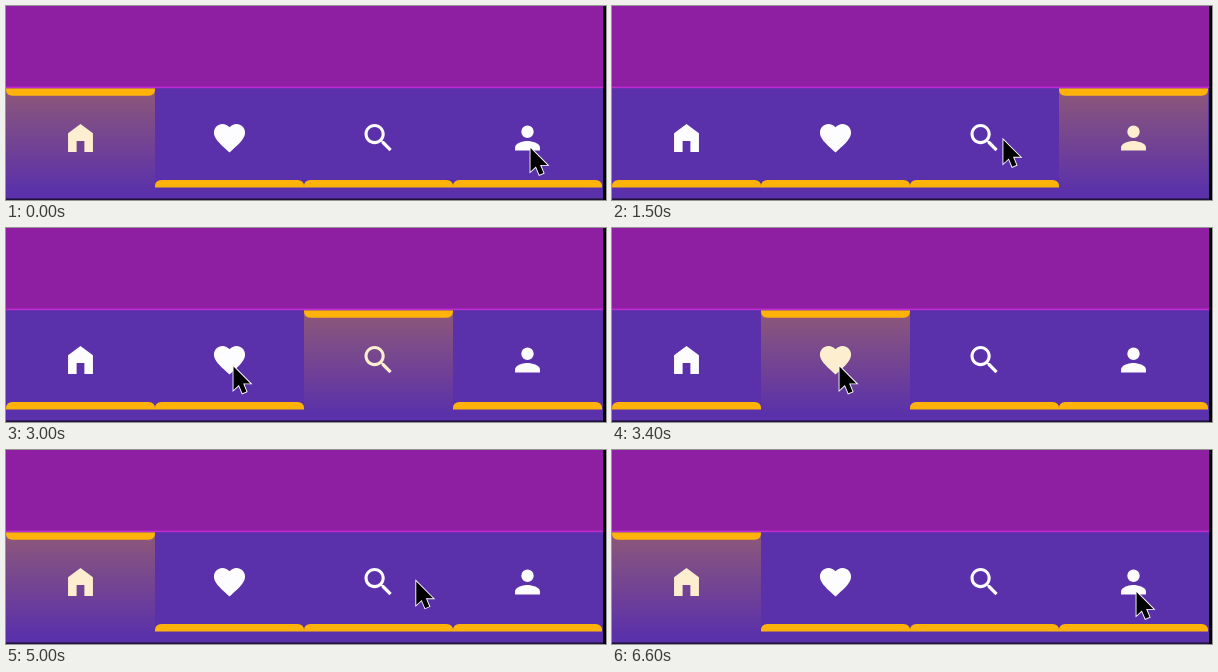
These frames come from a looping animation (600x194 px, 6700 ms). An HTML page:

```html
<!DOCTYPE html>
<html lang="en">
<head>
<meta charset="utf-8">
<title>Tab bar</title>
<style>
  html, body { margin: 0; width: 100%; height: 100%; overflow: hidden; background: #5a30ab; }
  svg { display: block; width: 100vw; height: 100vh; }
</style>
</head>
<body>
<svg id="stage" viewBox="0 0 600 194">
  <defs>
    <linearGradient id="glow" x1="0" y1="0" x2="0" y2="1">
      <stop offset="0" stop-color="#ffb30a" stop-opacity=".31"/>
      <stop offset="1" stop-color="#ffb30a" stop-opacity="0"/>
    </linearGradient>
  </defs>
  <rect width="600" height="194" fill="#5a30ab"/>
  <rect width="600" height="81" fill="#8e1fa2"/>
  <rect y="80.6" width="600" height="1.6" fill="#c02bd2"/>
  <g id="tabs"></g>
  <rect y="192.4" width="600" height="1.6" fill="#21133f"/>
  <rect x="597" width="3" height="194" fill="#000"/>
  <path id="cursor" d="M0 0V23.5L5.4 18.5 8.9 26.8 13 25 9.6 16.9H16.8Z"
        fill="#000" stroke="#fff" stroke-width="1.8" paint-order="stroke"/>
</svg>
<script>
const LOOP = 6700, TAB = 149, TOP = 82.4, LOW = 174, BAR = 7.4, FADE = 300;
const ICONS = [
  'M4 21V9l8-6 8 6v12h-5.5v-7h-5v7z',
  'M12 21.35l-1.45-1.32C5.4 15.36 2 12.28 2 8.5 2 5.42 4.42 3 7.5 3c1.74 0 3.41.81 4.5 2.09C13.09 3.81 14.76 3 16.5 3 19.58 3 22 5.42 22 8.5c0 3.78-3.4 6.86-8.55 11.54z',
  'M15.5 14h-.79l-.28-.27C15.41 12.59 16 11.11 16 9.5 16 5.91 13.09 3 9.5 3S3 5.91 3 9.5 5.91 16 9.5 16c1.61 0 3.09-.59 4.23-1.57l.27.28v.79l5 4.99L20.49 19l-4.99-5zm-6 0C7.01 14 5 11.99 5 9.5S7.01 5 9.5 5 14 7.01 14 9.5 11.99 14 9.5 14z',
  'M12 12a4 4 0 1 0 0-8 4 4 0 1 0 0 8zm0 2c-2.67 0-8 1.34-8 4v2h16v-2c0-2.66-5.33-4-8-4z'
];
const CLICKS = [
  { at: 360, tab: 3 },
  { at: 1841, tab: 2 },
  { at: 3050, tab: 1 },
  { at: 4450, tab: 0 }
];
const HOME = [75.2, 142], HEART = [227.5, 138.5], SEARCH = [376, 133], USER = [524.5, 142];
const MOVES = [
  { from: USER, to: SEARCH, start: 1100, end: 1750, arc: 0 },
  { from: SEARCH, to: HEART, start: 2350, end: 2950, arc: 0 },
  { from: HEART, to: HOME, start: 3450, end: 4100, arc: 0 },
  { from: HOME, to: USER, start: 4620, end: 5470, arc: 14 }
];

const clamp = v => Math.min(1, Math.max(0, v));
const mix = (a, b, p) => a + (b - a) * p;

// cubic-bezier(.25, .1, .25, 1)
function ease(x) {
  if (x <= 0 || x >= 1) return clamp(x);
  const curve = (u, a, b) => 3 * u * (1 - u) * ((1 - u) * a + u * b) + u ** 3;
  let lo = 0, hi = 1;
  for (let i = 0; i < 24; i++) {
    const mid = (lo + hi) / 2;
    if (curve(mid, .25, .25) < x) lo = mid; else hi = mid;
  }
  return curve(lo, .1, 1);
}

function add(parent, tag, attrs) {
  const el = document.createElementNS('http://www.w3.org/2000/svg', tag);
  for (const k in attrs) el.setAttribute(k, attrs[k]);
  return parent.appendChild(el);
}

const layer = document.getElementById('tabs');
const cursor = document.getElementById('cursor');
const tabs = ICONS.map((d, i) => ({
  x: i * TAB,
  glow: add(layer, 'rect', { x: i * TAB, width: TAB, fill: 'url(#glow)' }),
  bar: add(layer, 'path', { fill: '#ffb30a' }),
  icon: add(layer, 'path', {
    d, 'fill-rule': 'evenodd',
    transform: `translate(${(i + .5) * TAB} 132) scale(1.556) translate(-12 -12)`
  })
}));

function barPath(x, y, hanging) {
  const r = 6.5, w = TAB - 2 * r, s = BAR - r;
  return hanging
    ? `M${x} ${y}h${TAB}v${s}q0 ${r} ${-r} ${r}h${-w}q${-r} 0 ${-r} ${-r}z`
    : `M${x} ${y + BAR}v${-s}q0 ${-r} ${r} ${-r}h${w}q${r} 0 ${r} ${r}v${s}z`;
}

function drawTab(tab, p, active) {
  const y = mix(LOW, TOP, p);
  const top = active ? y : y + BAR - 1;
  const bottom = 181 + 7 * clamp(p * 6);
  tab.bar.setAttribute('d', barPath(tab.x, y, active));
  tab.glow.setAttribute('y', top);
  tab.glow.setAttribute('height', Math.max(0, bottom - top));
  tab.glow.setAttribute('opacity', clamp(p * 8));
  tab.icon.setAttribute('fill',
    `rgb(${mix(253, 252, p)},${mix(252, 238, p)},${mix(255, 206, p)})`);
}

function draw(t) {
  let active = 0, last = 0, start = -FADE;
  for (const c of CLICKS) {
    if (t >= c.at) {
      last = active;
      active = c.tab;
      start = c.at;
    }
  }
  const p = ease((t - start) / FADE);
  tabs.forEach((tab, i) =>
    drawTab(tab, i === active ? p : i === last ? 1 - p : 0, i === active));

  let [x, y] = USER;
  for (const m of MOVES) {
    if (t < m.start) break;
    const q = ease((t - m.start) / (m.end - m.start));
    x = mix(m.from[0], m.to[0], q);
    y = mix(m.from[1], m.to[1], q) - 4 * m.arc * q * (1 - q);
  }
  cursor.setAttribute('transform', `translate(${x} ${y})`);
}

const began = performance.now();
function tick() {
  draw((performance.now() - began) % LOOP);
  requestAnimationFrame(tick);
}
tick();
</script>
</body>
</html>
```
